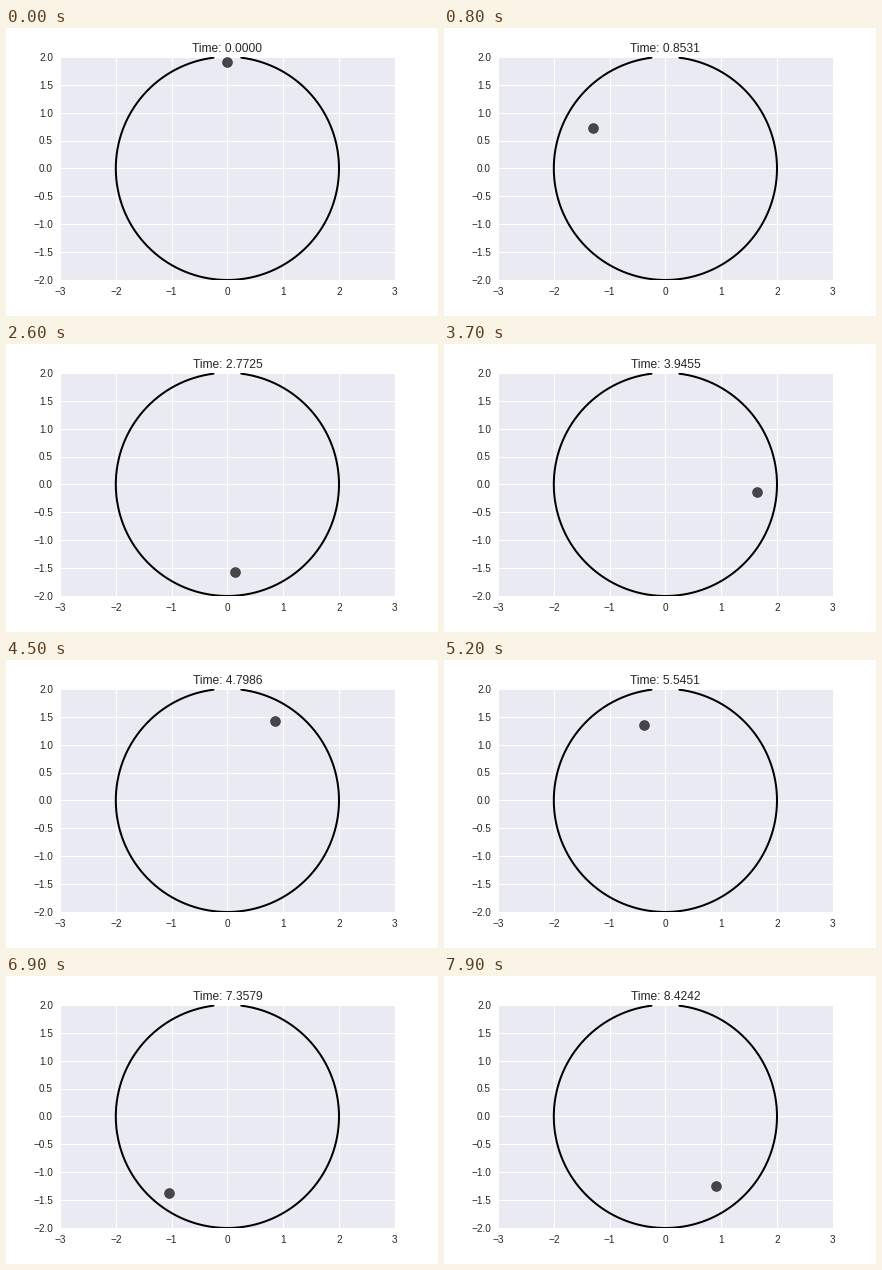
Write a matplotlib script that moves like this. It is 432x288 px and loops after 8000 ms.

```python
import numpy as np
import matplotlib.pyplot as plt
from matplotlib.animation import FuncAnimation

plt.rcParams.update({
    "font.family": "Liberation Sans",
    "text.color": "0.15",
    "xtick.labelcolor": "0.15",
    "ytick.labelcolor": "0.15",
    "axes.axisbelow": True,
})

FRAMES, INTERVAL = 80, 100
DT = 0.106636                 # simulated time per frame
WALL, GAP = 2.0, 0.125        # wall radius, half angle of the opening
REACH = 1.9                   # radius at which the ball bounces
HALF = np.radians(42.425)     # half the central angle of one chord
FLIGHT = 1.2475               # time between two bounces


def position(t):
    """Ball moving on straight chords inside the circle."""
    bounce, left = divmod(t, FLIGHT)
    mid = np.pi / 2 + (2 * bounce + 1) * HALF
    near = REACH * np.cos(HALF)
    along = REACH * np.sin(HALF) * (2 * left / FLIGHT - 1)
    x = near * np.cos(mid) - along * np.sin(mid)
    y = near * np.sin(mid) + along * np.cos(mid)
    return x, y


fig = plt.figure(figsize=(6, 4), dpi=72, facecolor="white")
ax = fig.add_axes([0.125, 0.125, 0.775, 0.775], facecolor="#EAEAF2")
ax.set(xlim=(-3, 3), ylim=(-2, 2),
       xticks=np.arange(-3, 4), yticks=np.arange(-2, 2.1, 0.5))
ax.tick_params(length=0, pad=7, labelsize=10)
ax.grid(True, color="white", lw=1, ls="-")
for spine in ax.spines.values():
    spine.set_visible(False)

a = np.linspace(np.pi / 2 + GAP, 5 * np.pi / 2 - GAP, 400)
ax.plot(WALL * np.cos(a), WALL * np.sin(a), color="black", lw=2,
        solid_capstyle="round")
ball, = ax.plot([], [], "o", color="black", ms=10, mew=0.5, alpha=0.7)
title = ax.set_title("", fontsize=12, pad=5)


def update(i):
    t = i * DT
    x, y = position(t)
    ball.set_data([x], [y])
    title.set_text(f"Time: {t:.4f}")
    return ball, title


anim = FuncAnimation(fig, update, frames=FRAMES, interval=INTERVAL,
                     repeat=True, repeat_delay=0, blit=False)
plt.show()
```
